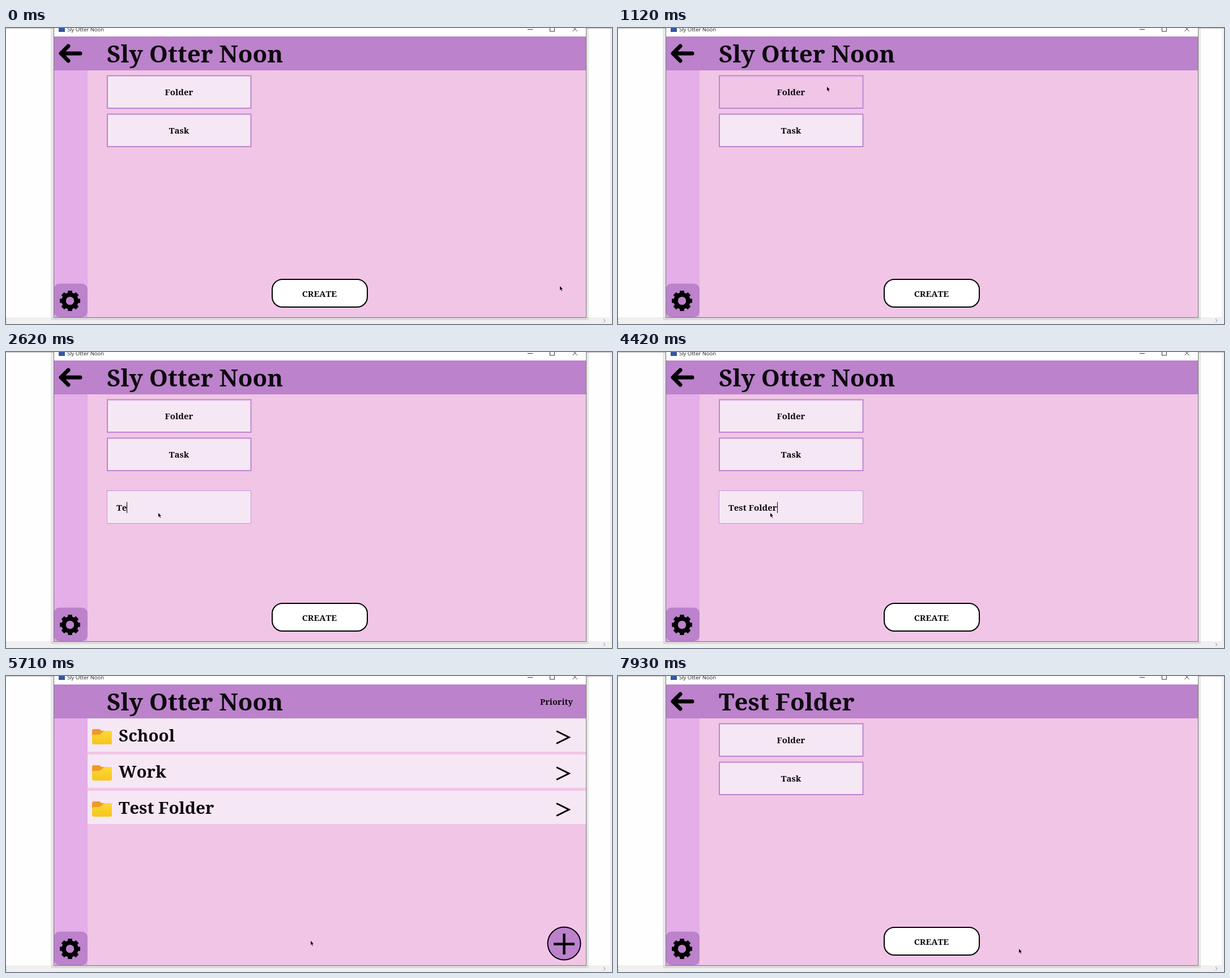
Recreate the animation shown at these times as an HTML page. Size 1070 px wide and 524 px high, loop 7990 ms.

```html
<!DOCTYPE html>
<html lang="en">
<head>
<meta charset="utf-8">
<title>Task folders</title>
<style>
  html, body { margin: 0; width: 100%; height: 100%; overflow: hidden; background: #fefefe; }
  svg { display: block; width: 1070px; height: 524px; }
  text { font: bold 15px "Noto Serif", serif; font-kerning: none; fill: #0d080e; white-space: pre; }
  .title { font-size: 42px; }
  .row { font-size: 29.5px; }
  .priority { font-size: 14.5px; }
  .mid { text-anchor: middle; }
  .caption { font: 9.5px "Open Sans", sans-serif; fill: #222; }
  .pale { fill: #f5e7f4; }
  .violet { fill: #bc82cc; }
  .button { fill: #f5e7f4; stroke: #be85d0; stroke-width: 2; }
  .hover { fill: #f1c5e6; }
  .line { fill: none; stroke: #000; }
</style>
</head>
<body>
<svg viewBox="0 0 1070 524">
  <defs>
    <linearGradient id="yellow" x2="0" y2="1"><stop stop-color="#fdd835"/><stop offset="1" stop-color="#f5c51c"/></linearGradient>
  </defs>

  <!-- desktop behind the window -->
  <rect x="1066" width="4" height="512" fill="#f1f1f1"/>
  <rect y="512" width="1070" height="12" fill="#f0f0f0"/>
  <path class="line" d="M0 .5H1070" style="stroke:#b5b5b5"/>
  <path class="line" d="M1 515l-3 3 3 3M1055 515l3 3-3 3" style="stroke:#8a8a8a"/>
  <rect x="79" width="950" height="517" rx="3" fill="#000" opacity=".09"/>

  <!-- window -->
  <rect x="84" width="940" height="15" fill="#fff"/>
  <rect x="93" y="-4" width="11" height="11" fill="#3556a5"/>
  <text class="caption" x="108" y="6">Sly Otter Noon</text>
  <path class="line" d="M921 2.5h9M960.5 -3v9h8v-9M1000.5 -2l8 8M1008.5 -2l-8 8" style="stroke:#333"/>
  <rect x="84" y="75" width="940" height="437" fill="#f1c5e6"/>
  <rect x="84" y="75" width="60" height="437" fill="#e4aee8"/>
  <rect class="violet" x="84" y="15" width="940" height="60"/>
  <rect class="violet" x="84.5" y="452.5" width="59.5" height="59.5" rx="10"/>
  <g id="gear" transform="translate(113 483)"><circle class="line" r="11" stroke-width="7.5"/></g>
  <text class="title" id="title" x="178" y="61"></text>
  <path class="line" id="back" d="M98 45H131M110 32L97 45l13 13" stroke-width="7" stroke-linecap="round" stroke-linejoin="round"/>

  <g id="create">
    <rect class="button" id="folder" x="179" y="84.5" width="253.500" height="57.5"/>
    <rect class="button" id="task" x="179" y="152.5" width="253.500" height="57.5"/>
    <text class="mid" x="305.5" y="119">Folder</text>
    <text class="mid" x="305.5" y="187">Task</text>
    <rect x="470" y="445" width="168" height="49" rx="18" fill="#fff" stroke="#000" stroke-width="2"/>
    <text class="mid" x="553.5" y="476">CREATE</text>
    <g id="field">
      <rect class="pale" x="178.5" y="245.5" width="254" height="58" stroke="#c993d8"/>
      <text id="input" x="195" y="281"></text>
      <path class="line" id="caret" d="M.5 265.5v19.5"/>
    </g>
  </g>

  <g id="list"></g>

  <g id="browse">
    <text class="priority" x="943" y="51">Priority</text>
    <circle class="violet" cx="985.5" cy="473.5" r="29" stroke="#000" stroke-width="2"/>
    <path class="line" d="M967 474.5h37M985.5 456v37" stroke-width="4.5"/>
  </g>

  <path id="pointer" d="M0 0v7l1.600-1.400 1.600 3 1-.5-1.500-3h2.300z"/>
  <path class="line" d="M84.5 0V512.5H1024.5V0" style="stroke:#777"/>
</svg>
<script>
const LOOP = 7990;
const APP = "Sly Otter Noon", NAME = "Test Folder";
const FIELD_AT = 1240, CARET_AT = 1830, TYPE_AT = 2420, KEY_GAP = 200;
const LIST_AT = 5500, OPEN_AT = 6540, ADD_AT = 7700;

const $ = id => document.getElementById(id);
const show = (id, on) => $(id).style.display = on ? "" : "none";
const add = (id, markup) => $(id).insertAdjacentHTML("beforeend", markup);
const clamp = k => Math.min(1, Math.max(0, k));
const easeOut = k => 1 - (1 - k) ** 2;

// each stroke of the mouse: start, end, x, y
const moves = [
  [110, 740, 430, 215], [740, 1100, 369, 104], [1240, 1710, 269, 285],
  [4420, 5500, 538, 469], [6000, OPEN_AT, 401, 232], [6590, 7580, 985, 481], [ADD_AT, 7930, 708, 483]
];

function pointerAt(t) {
  let x = 978, y = 457;
  for (const [from, to, toX, toY] of moves) {
    const k = easeOut(clamp((t - from) / (to - from)));
    x += (toX - x) * k;
    y += (toY - y) * k;
  }
  return [Math.round(x), Math.round(y)];
}

function draw(t) {
  const [x, y] = pointerAt(t);
  const page = t < LIST_AT ? "create" : t < OPEN_AT ? "list" : t < ADD_AT ? "folder" : "create";
  const over = top => x > 178 && x < 433 && y > top && y < top + 58;

  $("title").textContent = t < OPEN_AT ? APP : NAME;
  show("back", page !== "list");
  show("create", page === "create");
  show("list", page === "list");
  show("browse", page !== "create");
  show("field", t >= FIELD_AT && t < LIST_AT);
  show("caret", t >= CARET_AT);
  $("folder").classList.toggle("hover", over(84));
  $("task").classList.toggle("hover", over(152));

  $("input").textContent = NAME.slice(0, Math.max(0, Math.floor((t - TYPE_AT) / KEY_GAP) + 1));
  const caretX = Math.round(195 + $("input").getComputedTextLength());
  $("caret").setAttribute("transform", `translate(${caretX} 0)`);
  $("pointer").setAttribute("transform", `translate(${x} ${y})`);
}

["School", "Work", NAME].forEach((label, i) => add("list", `
  <g transform="translate(144 ${75 + 64 * i})">
    <rect class="pale" width="880" height="59"/>
    <path d="M8 34V22q0-3 3-3h10l4 3h8v10z" fill="#ee9a26"/>
    <path d="M8 32q0-3 3-3h9q2 0 4-2l3-3q2-2 4-2h9q3 0 3 3v18q0 3-3 3h-29q-3 0-3-3z" fill="url(#yellow)"/>
    <path class="line" d="M828 22.5L850 33.5 828 44.5" stroke-width="3"/>
    <text class="row" x="55" y="41">${label}</text>
  </g>`));

for (let a = 0; a < 360; a += 45) {
  add("gear", `<rect x="-3.8" y="-18" width="7.6" height="6" rx="1" transform="rotate(${a})"/>`);
}

const start = performance.now();
function tick() {
  draw((performance.now() - start) % LOOP);
  requestAnimationFrame(tick);
}
tick();
</script>
</body>
</html>
```
